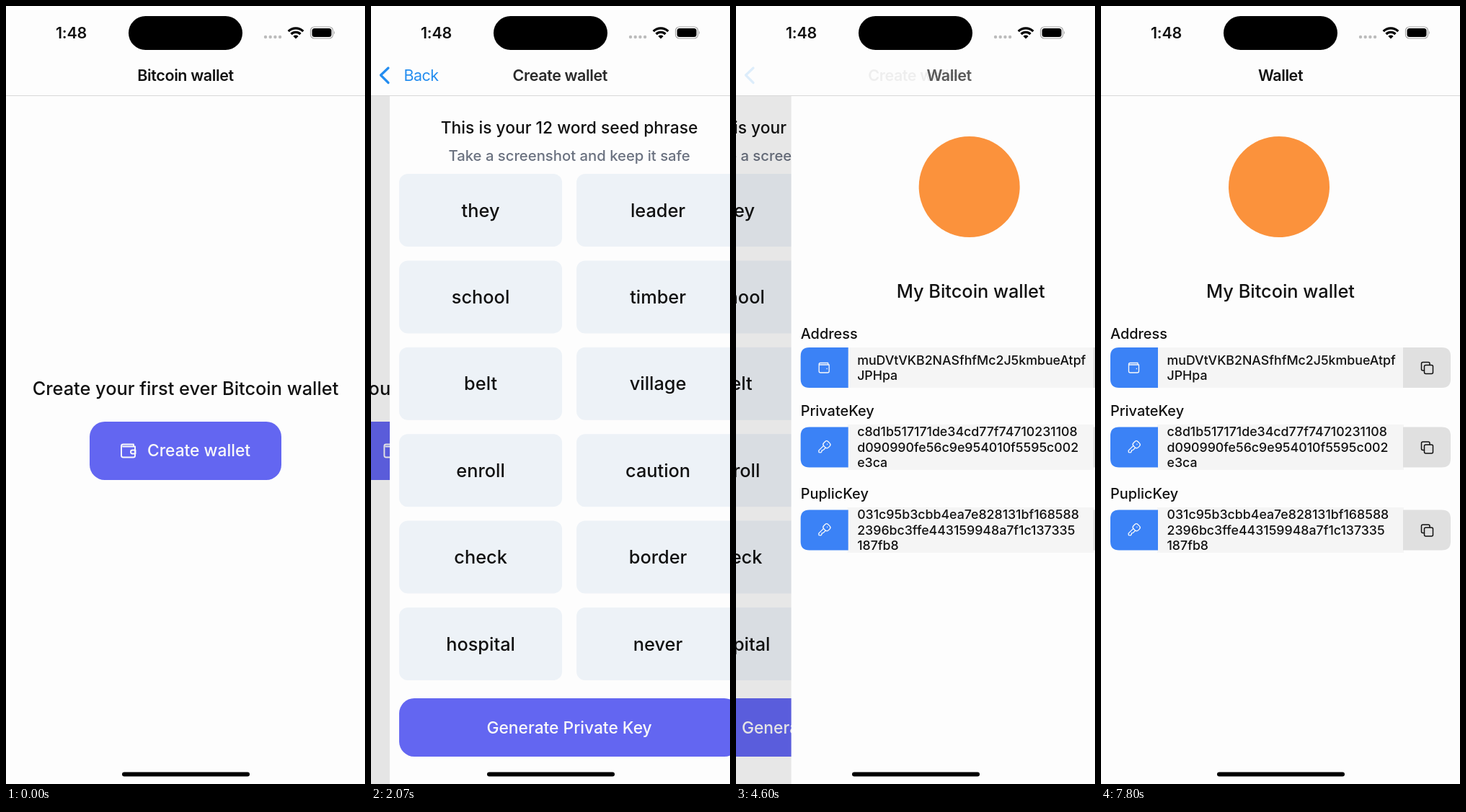
Animation of 498x1080 px, one loop 7870 ms. Source, as an HTML page:

```html
<!DOCTYPE html>
<html lang="en">
<head>
<meta charset="utf-8">
<title>Wallet flow</title>
<style>
  html, body { margin: 0; width: 100%; height: 100%; overflow: hidden; background: #fdfdfd; }
  svg { display: block; width: 100vw; height: 100vh; }
  text { font-family: Inter, Roboto, sans-serif; font-optical-sizing: none; font-weight: 500; fill: #111; }
  .mid { text-anchor: middle; }
  .nav { font-size: 21.5px; font-weight: 600; letter-spacing: -.4px; }
  .back { font-weight: 400; letter-spacing: -.55px; fill: #0a80ee; }
  .lg { font-size: 25.34px; }
  .md { font-size: 22.8px; }
  .sm { font-size: 20.27px; }
  .name { font-size: 19.9px; }
  .code { font-size: 17.74px; }
  .muted { fill: #6b7280; }
  .light { fill: #fafafa; }
  .icon { fill: none; stroke-width: 1.5; stroke-linecap: round; stroke-linejoin: round; }
</style>
</head>
<body>
<svg viewBox="0 0 498 1080" preserveAspectRatio="none">
  <g id="home"></g>
  <rect id="dimHome" width="498" height="1080" opacity="0"/>
  <g id="seed"></g>
  <rect id="dimSeed" width="498" height="1080" opacity="0"/>
  <g id="wallet"></g>

  <rect width="498" height="124" fill="#fdfdfd"/>
  <rect y="124" width="498" height="1" fill="#d8d8d8"/>
  <text id="homeTitle" class="nav mid" x="249" y="103.5">Bitcoin wallet</text>
  <text id="seedTitle" class="nav mid" x="249" y="103.5">Create wallet</text>
  <text id="walletTitle" class="nav mid" x="249" y="103.5">Wallet</text>
  <path id="chevron" d="M24 86L13.5 96L24 106.5" fill="none" stroke="#0a80ee" stroke-width="3.2" stroke-linecap="round" stroke-linejoin="round"/>
  <text id="backLabel" class="nav back" x="38" y="103.5">Back</text>

  <text x="90.5" y="45" class="mid" style="font-size:21.5px;font-weight:600;letter-spacing:-.2px">1:48</text>
  <rect x="170" y="14" width="158" height="47" rx="23.5"/>
  <path d="M360 43H382" stroke="#bcbcbc" stroke-width="4.4" stroke-linecap="round" stroke-dasharray="0 6.7"/>
  <g fill="none" stroke="#000" stroke-width="3.3">
    <path d="M391.7 35.2A14.6 14.6 0 0 1 412.3 35.2"/>
    <path d="M395.5 39A9.2 9.2 0 0 1 408.5 39"/>
    <path d="M402 45.5L398.4 41.9A5.1 5.1 0 0 1 405.6 41.9Z" fill="#000" stroke="none"/>
  </g>
  <rect x="422.5" y="29" width="31" height="16" rx="5" fill="none" stroke="#a6a6a6" stroke-width="1.2"/>
  <rect x="424.5" y="31" width="27" height="12" rx="3.5"/>
  <path d="M455 34.5q2 2.500 0 5z" fill="#a6a6a6"/>
  <rect x="161" y="1063.5" width="177" height="6" rx="3"/>
</svg>
<script>
const $ = id => document.getElementById(id);
const WIDTH = 498, LOOP = 7870, STEP = 1000 / 15;
const INDIGO = '#6366f1', LIGHT = '#fafafa';

const rect = (x, y, w, h, fill, r = 0) =>
  `<rect x="${x}" y="${y}" width="${w}" height="${h}" rx="${r}" fill="${fill}"/>`;
const label = (x, y, text, cls) => `<text x="${x}" y="${y}" class="${cls}">${text}</text>`;
const icon = (x, y, color, body) =>
  `<g class="icon" transform="translate(${x} ${y})" stroke="${color}">${body}</g>`;
const page = rect(0, 0, WIDTH, 1080, '#fdfdfd');

const buttonWallet = `<path stroke-width="1.9" d="M7.5 -5.5V-8.5H-7Q-9.5 -8.5 -9.5 -6V7Q-9.5 9.5 -7 9.5H7Q9.5 9.5 9.5 7.5V-5.5H-7.5M10 -.5H6Q3.5 -.5 3.5 2T6 4.5H10Z"/>`;
const smallWallet = `<path stroke-width="1.3" d="M5.5 -4V-6.5H-5Q-7 -6.5 -7 -4.5V5Q-7 7 -5 7H5Q7 7 7 5V-4H-6M3.8 1.5h.2"/>`;
const key = `<g transform="rotate(45)" stroke-width="1.3"><rect x="-4.5" y="-9.5" width="9" height="8.5" rx="3"/><path d="M0 -6.2h.1M-2 -1V8.5L0 10L2 8.5V6.5L.8 5L2 3.5V-1"/></g>`;
const copy = `<path d="M-4 4H-5.5Q-7.5 4 -7.5 2V-5.5Q-7.5 -7.5 -5.5 -7.5H2Q4 -7.5 4 -5.5V-4"/><rect x="-3.5" y="-3.5" width="12" height="12" rx="2"/>`;

$('home').innerHTML = page +
  label(249, 540, 'Create your first ever Bitcoin wallet', 'lg mid') +
  rect(116, 577, 266, 81, INDIGO, 21) +
  icon(169.5, 617, LIGHT, buttonWallet) +
  label(267.5, 625, 'Create wallet', 'md mid light');

const words = 'they leader school timber belt village enroll caution check border hospital never'.split(' ');
$('seed').innerHTML = page +
  label(249, 176.5, 'This is your 12 word seed phrase', 'md mid') +
  label(249, 215, 'Take a screenshot and keep it safe', 'sm mid muted') +
  words.map((word, i) => {
    const x = 13 + i % 2 * 246, y = 233 + (i >> 1) * 120.4;
    return rect(x, y, 226, 101, '#edf2f7', 12) + label(x + 113, y + 59.5, word, 'lg mid');
  }).join('') +
  rect(13, 961, 472, 81, INDIGO, 21) +
  label(249, 1010, 'Generate Private Key', 'md mid light');

function field(name, y, lines, glyph, height) {
  const mid = y + 28, top = mid - height / 2;
  const first = mid + 6.3 - (lines.length - 1) * 10.8;
  return label(13, top - 12, name, 'name') +
    rect(78, top, 342, height, '#f5f5f5') +
    `<path d="M79 ${y}H25Q13 ${y} 13 ${y + 12}V${y + 44}Q13 ${y + 56} 25 ${y + 56}H79Z" fill="#3b82f6"/>` +
    `<path d="M419 ${y}H473Q485 ${y} 485 ${y + 12}V${y + 44}Q485 ${y + 56} 473 ${y + 56}H419Z" fill="#e0e0e0"/>` +
    icon(45.5, mid, LIGHT, glyph) + icon(452, mid, '#111', copy) +
    lines.map((line, i) => label(91.5, first + i * 21.6, line, 'code')).join('');
}

$('wallet').innerHTML = page +
  '<circle cx="247" cy="251" r="70" fill="#fb923c"/>' +
  label(249, 405, 'My Bitcoin wallet', 'lg mid') +
  field('Address', 474, ['muDVtVKB2NASfhfMc2J5kmbueAtpf', 'JPHpa'], smallWallet, 56) +
  field('PrivateKey', 584.5, ['c8d1b517171de34cd77f74710231108', 'd090990fe56c9e954010f5595c002', 'e3ca'], key, 63) +
  field('PuplicKey', 699.5, ['031c95b3cbb4ea7e828131bf168588', '2396bc3ffe443159948a7f1c137335', '187fb8'], key, 63);

// Each push is a critically damped spring: [time, spring phase] pairs, held until it settles.
const pushes = [
  { settle: 2600, keys: [[1793, 0], [2200, 6.96]] },
  { settle: 6600, keys: [[4199, 0], [4200, .13], [4270, .13], [4600, 3.33], [4870, 8]] }
];

function progress({ settle, keys }, t) {
  if (t <= keys[0][0]) return 0;
  if (t >= settle) return 1;
  const next = keys.findIndex(k => k[0] > t);
  let x = keys[keys.length - 1][1];
  if (next > 0) {
    const [t0, x0] = keys[next - 1], [t1, x1] = keys[next];
    x = x0 + (x1 - x0) * (t - t0) / (t1 - t0);
  }
  return 1 - (1 + x) * Math.exp(-x);
}

const clamp = v => Math.max(0, Math.min(1, v));
function place(id, x, opacity = 1) {
  $(id).setAttribute('transform', `translate(${x.toFixed(2)} 0)`);
  $(id).setAttribute('opacity', clamp(opacity).toFixed(3));
}

function draw(time) {
  const t = Math.floor((time + 3.5) / STEP) * STEP + .5;
  const a = progress(pushes[0], t), b = progress(pushes[1], t);
  const fadeIn = p => (p - .5) * 2, fadeOut = p => 1 - p / .9;

  place('home', -.3 * WIDTH * a);
  place('seed', WIDTH * (1 - a) - .3 * WIDTH * b);
  place('wallet', WIDTH * (1 - b));
  $('dimHome').setAttribute('opacity', .1 * a);
  $('dimSeed').setAttribute('opacity', .1 * b);

  place('homeTitle', -144 * a, fadeOut(a));
  place('seedTitle', 254 * (1 - a), fadeIn(a) * clamp(fadeOut(b)));
  place('backLabel', 144 * (1 - a), fadeIn(a) * clamp(1 - 1.5 * b));
  place('chevron', 0, fadeIn(a) * clamp(1 - b / .97));
  place('walletTitle', 303 * (1 - b), fadeIn(b));
}

const start = performance.now();
function tick() {
  draw((performance.now() - start) % LOOP);
  requestAnimationFrame(tick);
}
tick();
</script>
</body>
</html>
```
